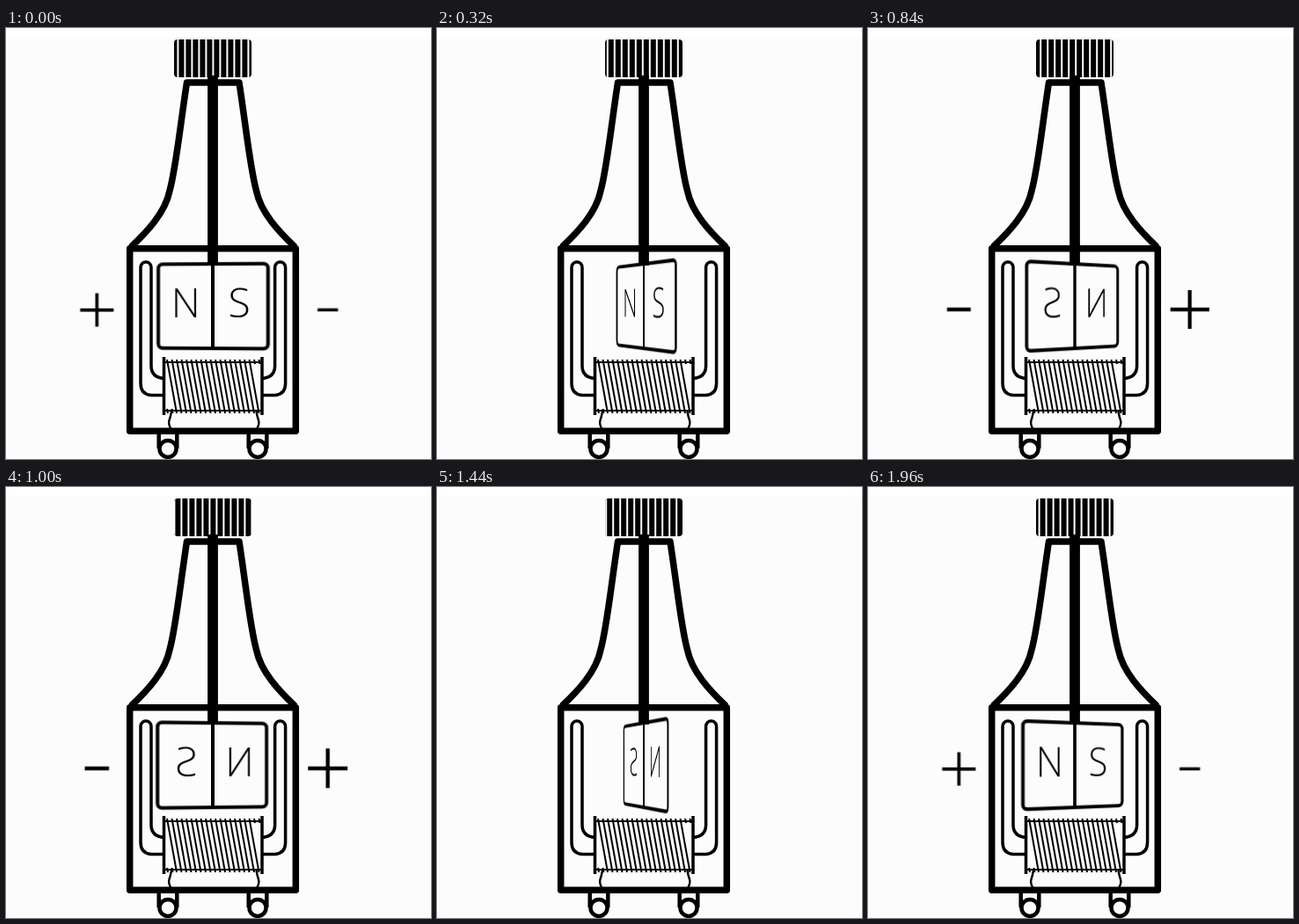
These frames come from a looping animation (483x490 px, 2 s). An HTML page:

```html
<!DOCTYPE html>
<html lang="en">
<head>
<meta charset="utf-8">
<title>Bottle dynamo</title>
<style>
  html, body { margin: 0; width: 100%; height: 100%; overflow: hidden; background: #fff; }
  .stage { position: relative; width: 483px; height: 490px; overflow: hidden; }
  .scene, .view { position: absolute; left: 0; top: 0; width: 483px; height: 490px; }
  svg { fill: none; stroke: #000; }

  .view { perspective: 604px; perspective-origin: 235px 316px; }
  .magnet {
    position: absolute; left: 165px; top: 256px; width: 140px; height: 120px;
    overflow: visible; stroke-width: 4;
    animation: spin 2s infinite;
  }
  .magnet text {
    font: 300 46px "Open Sans", Lato, sans-serif;
    fill: #000; stroke: none; text-anchor: middle;
  }
  .grooves {
    stroke: #fff; stroke-width: 43; stroke-dasharray: 2 6;
    animation: knurl 2s steps(50) infinite;
  }
  .sign { stroke-width: 5.2; transform-origin: 0 0; }
  .first { animation: first 2s infinite; }
  .second { animation: second 2s infinite; }

  /* 40 ms ticks, with one tick held at 72 % */
  @keyframes spin {
    0% { transform: rotateY(-4deg); animation-timing-function: steps(36); }
    72% { transform: rotateY(-246.6deg); animation-timing-function: steps(1); }
    76% { transform: rotateY(-260.1deg); animation-timing-function: steps(12); }
    100% { transform: rotateY(-341deg); }
  }
  @keyframes knurl {
    from { stroke-dashoffset: 0; }
    to { stroke-dashoffset: -40px; }
  }
  @keyframes first {
    0% { transform: scale(.704); animation-timing-function: steps(8); }
    16% { transform: scale(0); }
    82% { transform: scale(0); animation-timing-function: steps(9); }
    100% { transform: scale(.792); }
  }
  @keyframes second {
    0%, 24% { transform: scale(0); animation-timing-function: steps(11); }
    46% { transform: scale(1); animation-timing-function: steps(12); }
    70%, 100% { transform: scale(0); }
  }
</style>
</head>
<body>
<div class="stage">
  <svg class="scene" viewBox="0 0 483 490">
    <defs>
      <path id="plus" d="M-27 -4.9H27M0 -31.9V22.1"/>
      <path id="minus" d="M-16.5 -4.9H16.5"/>
      <path id="tube" d="M180 417.5H165Q153 416.5 153 404V272a6 6 0 0 1 12 0V384Q165 397.5 180 398.5"/>
      <g id="terminal">
        <path stroke-width="4.5" d="M-10.3 460V478M10.3 460V478"/>
        <circle cy="478.4" r="9.5" stroke-width="4.5"/>
      </g>
      <clipPath id="cap"><rect x="191" y="13" width="88" height="43" rx="4"/></clipPath>
    </defs>

    <rect y="11" width="483" height="479" fill="#fcfcfc" stroke="none"/>

    <g clip-path="url(#cap)">
      <rect x="191" y="13" width="88" height="43" fill="#000" stroke="none"/>
      <path class="grooves" d="M186.4 34.5H290"/>
    </g>

    <g stroke-width="7.5" stroke-linejoin="round">
      <path d="M142 249C160 232 181 210 186 185C193 160 197 118 205.5 62H265C273.5 118 277.5 160 284.5 185C289.5 210 310.5 232 328.5 249"/>
      <rect x="140.7" y="250.7" width="188.6" height="207.6"/>
    </g>
    <path stroke-width="11.8" d="M235 54V270"/>

    <g stroke-width="3.5">
      <use href="#tube"/>
      <use href="#tube" transform="translate(470.6) scale(-1 1)"/>
      <path d="M179.5 374V440M291 374V440"/>
    </g>
    <path stroke-width="1.8" d="M180 380H291M180 435H291"/>
    <path id="coil" stroke-width="2"/>
    <path stroke-width="2.4" d="M188 436q-1 6 -2.5 10t2.5 11M284.5 436q1 6 2.5 10t-2.5 11"/>

    <use href="#terminal" x="184"/>
    <use href="#terminal" x="286"/>

    <g transform="translate(103.3 324)">
      <use href="#plus" class="sign first"/>
      <use href="#minus" class="sign second"/>
    </g>
    <g transform="translate(365.7 324)">
      <use href="#minus" class="sign first"/>
      <use href="#plus" class="sign second"/>
    </g>
  </svg>

  <div class="view">
    <svg class="magnet" viewBox="-70 -60 140 120">
      <rect x="-62.5" y="-47.7" width="125" height="96" rx="5"/>
      <path d="M0 -48V48"/>
      <text x="-31" y="13">N</text>
      <text x="30" y="13">S</text>
    </svg>
  </div>
</div>
<script>
  // Slanted windings, plus the wire ends that peek out at the coil's edges
  const turns = 18, pitch = 5.5, left = 183;
  let d = "";
  for (let i = 0; i < turns; i++) d += `M${left + i * pitch} 377l11 61`;
  for (let i = 0; i < 2; i++) {
    d += `M${left + (turns + i) * pitch} 377l1 5M${left + i * pitch} 433l1 5`;
  }
  document.getElementById("coil").setAttribute("d", d);
</script>
</body>
</html>
```
